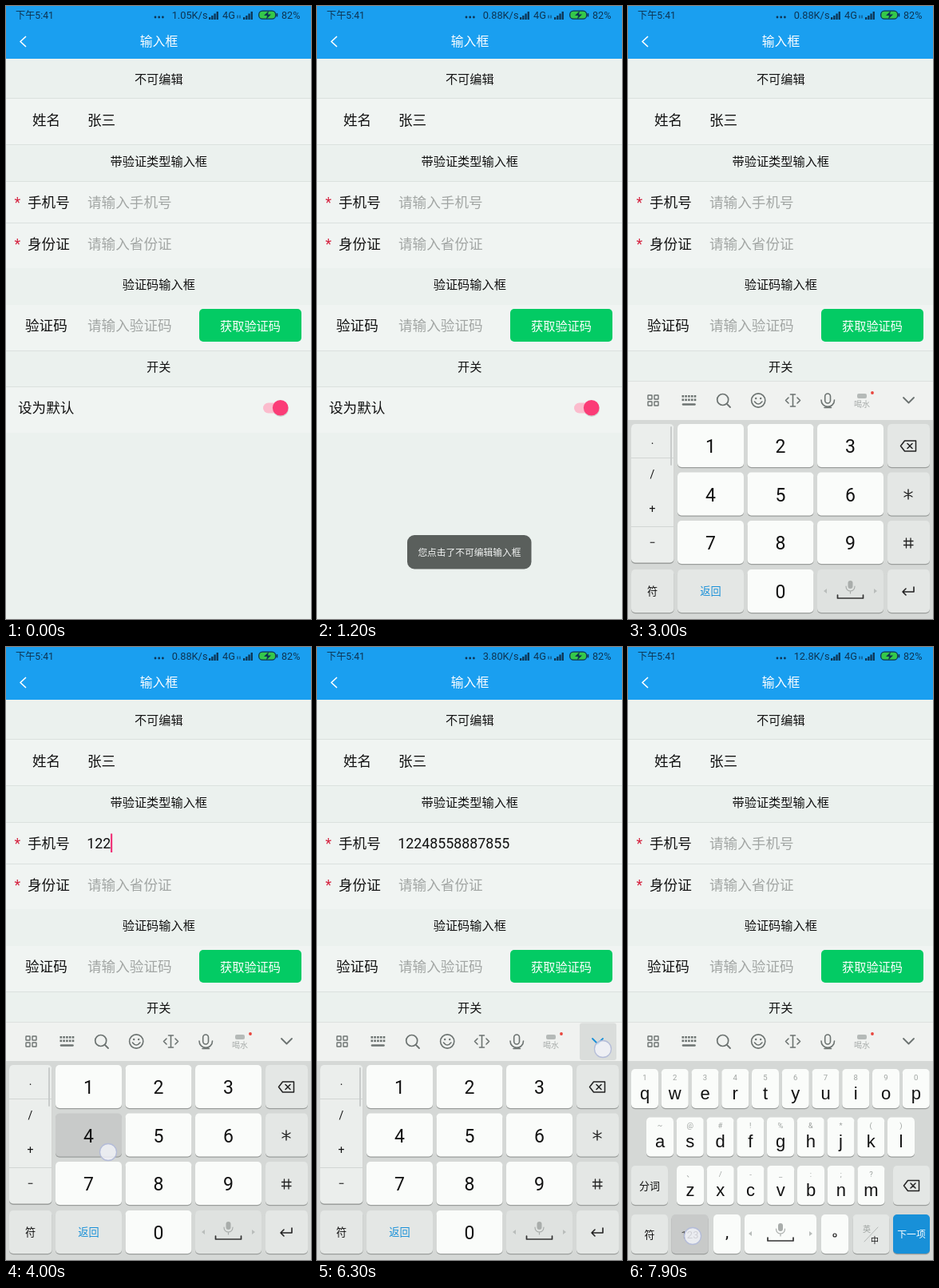
An HTML page that plays this animation: 382 px wide and 767 px high, repeating every 8 s.

```html
<!DOCTYPE html>
<html lang="zh-CN">
<head>
<meta charset="utf-8">
<title>输入框</title>
<style>
html, body { margin: 0; width: 100%; height: 100%; overflow: hidden; background: #ebf1ee; }
svg { display: block; width: 382px; height: 767px; }
text { font-family: Roboto, "Noto Sans CJK SC", "Noto Sans CJK", sans-serif; white-space: pre; }
.key { font-family: "Liberation Sans", Arial, sans-serif; }
.line { fill: none; stroke-linecap: round; stroke-linejoin: round; }
</style>
</head>
<body>
<svg id="stage" viewBox="0 0 382 767" xmlns="http://www.w3.org/2000/svg"></svg>
<script>
const LOOP = 8000, STEP = 100, KB_HEIGHT = 298;
const WHITE = '#fafcfa', GREY = '#e4e7e5', DOWN = '#c8cac9', BLUE = '#1890d8', ICON = '#6c7371';

// Markup helpers; text y is the visual middle of the line.
const text = (x, y, size, s, fill = '#111', more = '') =>
  `<text x="${x}" y="${y + size * 0.365}" font-size="${size}" fill="${fill}" ${more}>${s}</text>`;
const mid = (x, y, size, s, fill, more = '') =>
  text(x, y, size, s, fill, 'text-anchor="middle" ' + more);
const rect = (x, y, w, h, fill, r = 0, more = '') =>
  `<rect x="${x}" y="${y}" width="${w}" height="${h}" rx="${r}" fill="${fill}" ${more}/>`;
const circle = (x, y, r, fill, more = '') => `<circle cx="${x}" cy="${y}" r="${r}" fill="${fill}" ${more}/>`;
const line = (d, color = ICON, w = 1.6) =>
  `<path class="line" d="${d}" stroke="${color}" stroke-width="${w}"/>`;
const key = (name, x, y, w, h, fill = WHITE) =>
  rect(x, y + 1.2, w, h, '#9b9e9c', 5) + rect(x, y, w, h, fill, 5, `id="k-${name}"`);

function statusBar() {
  const ink = '#0d3453';
  const bars = x => [3, 5, 7.5, 10].map((h, i) => rect(x + i * 3.2, 17 - h, 2.3, h, ink)).join('');
  return rect(0, 0, 382, 66, '#1a9ff0') +
    text(12, 11.5, 12.2, '下午5:41', ink) +
    [187, 191.7, 196.4].map(x => circle(x, 14, 1.4, ink)).join('') +
    text(252.5, 11.5, 12.8, '', ink, 'id="speed" text-anchor="end"') +
    bars(254) + text(271, 11.5, 12.8, '4G', ink) + line('M290 12v3M293 12v3', ink, 1) + bars(297) +
    rect(316.7, 6.2, 21, 10, '#35c84a', 4.5, `stroke="${ink}" stroke-width="1.3"`) +
    rect(338.5, 9, 1.8, 4.5, ink, 0.8) +
    `<path d="M329 6l-6 6h4l-1 4.500 6-6h-4z" fill="${ink}"/>` +
    text(345, 11.5, 12.6, '82%', ink) +
    line('M24.500 38.500L18 44.500l6.500 6', '#fff', 1.7) +
    mid(191.5, 44.5, 15.8, '输入框', '#fff', 'font-weight="500"');
}

function form() {
  const rows = [[116, 57], [220, 51], [272, 56], [374, 57], [477, 57]];
  const heads = [[91, '不可编辑'], [194, '带验证类型输入框'], [348, '验证码输入框'], [451, '开关']];
  const labels = [[33, 143, '姓名'], [27, 246, '手机号'], [27, 297.5, '身份证'],
    [24, 400, '验证码'], [15, 503, '设为默认'], [102, 143, '张三']];
  const hint = '#a2a6a4';
  return rect(0, 66, 382, 701, '#ebf1ee') +
    rows.map(([y, h]) => rect(0, y, 382, h, '#f0f4f2')).join('') +
    [115, 173, 219, 271, 431, 476].map(y => rect(0, y, 382, 1, '#dbe1de')).join('') +
    heads.map(([y, s]) => mid(191.3, y, 15.2, s)).join('') +
    labels.map(([x, y, s]) => text(x, y, 17.6, s)).join('') +
    [246, 297.5].map(y => text(10.5, y, 17.6, '*', '#d52440')).join('') +
    text(102, 246, 17.6, '请输入手机号', hint, 'id="hint"') +
    text(102, 297.5, 17.6, '请输入省份证', hint) +
    text(102, 400, 17.6, '请输入验证码', hint) +
    text(101.3, 246, 17.8, '', '#111', 'id="phone"') +
    rect(101, 233.5, 2.2, 23.5, '#f0367a', 0, 'id="caret"') +
    rect(242, 379, 128, 41, '#03cb64', 5) + mid(306, 400, 15.2, '获取验证码', '#fff') +
    rect(322, 496.5, 28, 13, '#fbbccd', 6.5) +
    circle(344, 504, 10, '#cfd3d1') + circle(343.7, 502.8, 9.8, '#fb3c77');
}

function toolbar() {
  const dots = [0, 1, 2, 3, 4].map(i =>
    rect(67.5 + i * 3.8, 487, 2.6, 2.6, ICON) + rect(67.5 + i * 3.8, 491.5, 2.6, 2.6, ICON)).join('');
  const tiles = [[25, 487], [33, 487], [25, 495], [33, 495]].map(([x, y]) =>
    rect(x, y, 5, 5, 'none', 0.6, `stroke="${ICON}" stroke-width="1.4"`)).join('');
  return rect(0, 469, 382, 49, '#f0f2f0') + rect(0, 469, 382, 1, '#dde1df') +
    rect(329, 470.5, 46, 46.5, '#dadddb', 3, 'id="foldbg"') + tiles + dots +
    line('M69 498.500h14.500', ICON, 2.6) +
    circle(118.7, 492.5, 7, 'none', `stroke="${ICON}" stroke-width="1.7"`) + line('M124 498l4 4', ICON, 1.8) +
    circle(163.2, 493.5, 8.6, 'none', `stroke="${ICON}" stroke-width="1.6"`) +
    circle(160.2, 491, 1.2, ICON) + circle(166.2, 491, 1.2, ICON) + line('M158.500 495q4.700 6 9.400 0') +
    line('M206.500 486v15M203.500 486h6M203.500 501h6M201 490l-3.500 3.500 3.500 3.500M212 490l3.500 3.500-3.500 3.500') +
    rect(246.7, 485, 6.8, 12, 'none', 3.4, `stroke="${ICON}" stroke-width="1.6"`) +
    line('M242 493c0 11 16.500 11 16.500 0M246 502.500h8.500') +
    rect(287, 485, 12, 6, '#b5bab8', 2) + mid(293, 498, 10, '喝水', '#a8adab') +
    circle(306, 484, 1.9, '#e8453c') +
    `<path id="fold" class="line" d="M345 490l6.500 6.500 6.500-6.500" stroke-width="1.800"/>`;
}

const space = (x, y) => rect(x - 3, y - 14, 6, 10, '#a9adab', 3) +
  line(`M${x - 5.5} ${y - 7}c0 8 11 8 11 0M${x} ${y - 1}v3`, '#a9adab', 1.2) +
  line(`M${x - 16} ${y + 4}v4h32v-4`, '#333', 1.7);
const arrows = (a, b, y) => `<path d="M${a} ${y}l4-3v6zM${b} ${y}l-4-3v6z" fill="#b9bdbb"/>`;
const erase = (x, y) =>
  line(`M${x - 9.5} ${y}l5-6.500h14v13h-14zM${x - 1} ${y - 3}l6 6M${x + 5} ${y - 3}l-6 6`, '#222', 1.5);

const COLS = [62, 149.5, 237], ROWS = [523, 583.5, 644, 705];

function numberPad() {
  let s = rect(4, 524, 53.5, 174, '#9b9e9c', 5) + rect(4, 523, 53.5, 173.5, '#ebeeec', 5) +
    [565, 651].map(y => rect(4, y, 53.5, 1, '#d2d6d4')).join('') + rect(53, 526, 2, 49, '#c9cccb', 1) +
    ['·', '/', '+', '−'].map((c, i) => mid(30.5, [548, 586, 628.5, 671][i], 14, c)).join('');
  for (let n = 1; n <= 9; n++) {
    const x = COLS[(n - 1) % 3], y = ROWS[Math.floor((n - 1) / 3)];
    s += key(n, x, y, 83, 54) + mid(x + 41.5, y + 28, 23, n);
  }
  ROWS.forEach((y, i) => s += key('side' + i, 325, y, 53, 54, GREY));
  return s + erase(351, 550.5) +
    line('M351 605v12M346 608l10 6M356 608l-10 6', '#222', 1.4) +
    line('M348.500 666v12M354 666v12M345.500 669.500h11.500M345.500 674.500h11.500', '#222', 1.3) +
    line('M358 727v6h-14M348 729l-4 4 4 4', '#222', 1.6) +
    key('sym', 4, 705, 53.5, 54, GREY) + mid(30.7, 732.5, 13.2, '符') +
    key('back', 62, 705, 83, 54, GREY) + mid(103.5, 732.5, 13.2, '返回', BLUE) +
    key('zero', 149.5, 705, 83, 54) + mid(191, 733, 23, 0) +
    key('talk', 237, 705, 83, 54, '#dfe2e0') + space(278.5, 733) + arrows(245, 312, 732);
}

function letterPad() {
  const row = (letters, hints, x, y) => [...letters].map((c, i) => {
    const left = x + i * 37.75;
    return key(c, left, y, 34, 49) + mid(left + 17, y + 10.5, 9.5, hints[i], '#9ea3a0') +
      mid(left + 17, y + 29.5, 22, c, '#111', 'class="key"');
  }).join('');
  return row('qwertyuiop', '1234567890', 4, 528) +
    row('asdfghjkl', '~@#!%&*()', 23, 588.5) + row('zxcvbnm', '、/-_:;?', 61, 649) +
    key('split', 4, 649, 46, 49, GREY) + mid(27, 674, 13, '分词') +
    key('erase', 332, 649, 46, 49, GREY) + erase(355, 674) +
    key('sym2', 4, 710, 46, 49, GREY) + mid(27, 735, 13, '符') +
    key('123', 54.5, 710, 46, 49, GREY) + mid(77.5, 735, 13, '123', '#444') +
    key('comma', 107, 710, 34, 49) + mid(124, 731, 21, ',') +
    key('space', 146, 710, 90, 49) + space(191, 735) + arrows(151, 231, 734) +
    key('stop', 242, 710, 34, 49) + circle(259, 736, 2, 'none', 'stroke="#222" stroke-width="1.2"') +
    key('lang', 281.5, 710, 46, 49, GREY) + mid(299, 728, 10, '英', '#9ea3a0') +
    line('M296 744l17-18', '#b4b8b6', 1) + mid(309, 742, 10, '中') +
    key('next', 332, 710, 46, 49, BLUE) + mid(355, 735, 11.8, '下一项', '#fff');
}

const stage = document.getElementById('stage');
stage.innerHTML = form() + statusBar() +
  `<g id="kb">${rect(0, 518, 382, 249, '#d5d8d6')}${toolbar()}` +
  `<g id="num">${numberPad()}</g><g id="abc">${letterPad()}</g></g>` +
  `<g id="toast">${rect(113, 662, 155.5, 42.5, '#5a5f5c', 9)}${mid(191, 683.5, 11.75, '您点击了不可编辑输入框', '#f2f4f3')}</g>` +
  circle(0, 0, 10.5, 'rgba(242,244,250,.8)', 'id="touch" stroke="#b4bcd8" stroke-width="1.3"');
const el = id => document.getElementById(id);
const show = (id, on) => el(id).style.display = on ? '' : 'none';

// Typed digits, the time each key goes down, and where the finger lands.
const NUMBER = '12248558887855';
const PRESSES = [3400, 3600, 3800, 4000, 4300, 4400, 4600, 4700, 4800, 5000, 5100, 5300, 5500, 5700];
const SPOTS = { 1: [118, 560], 2: [205, 562], 4: [128, 632], 5: [199, 597], 7: [127, 645], 8: [205, 662] };
const COMMITS = PRESSES.map(t => t + 100);

// Touches: start, end, x, y, key.
const TOUCHES = [
  [500, 700, 212, 147], [2000, 2200, 226, 248], [2600, 2800, 72, 745, '123'],
  ...PRESSES.map((t, i) => [t, t + 100, ...SPOTS[NUMBER[i]], NUMBER[i]]),
  [6100, 6400, 358, 503, 'fold'], [7000, 7200, 237, 256], [7800, 8000, 81, 737, '123']
];
const SPEEDS = [[0, '1.05K/s'], [500, '0.88K/s'], [4200, '3.80K/s'], [7800, '12.8K/s']];
const BLINKS = [2100, ...COMMITS, 7100];

const ramp = (t, a, b) => Math.min(1, Math.max(0, (t - a) / (b - a)));
const easeOut = p => 1 - (1 - p) ** 2;
let pressed = null;

function press(name) {
  if (pressed) pressed.style.fill = '';
  pressed = name ? el('k-' + name) : null;
  if (pressed) pressed.style.fill = DOWN;
}

function draw(t) {
  el('speed').textContent = SPEEDS.filter(s => s[0] <= t).pop()[1];

  const typed = t < 6400 ? COMMITS.filter(c => c <= t).length : 0;
  el('phone').textContent = NUMBER.slice(0, typed);
  show('hint', !typed);
  const focused = (t >= 2100 && t < 6400) || t >= 7100;
  const since = t - (BLINKS.filter(b => b <= t).pop() || 0);
  show('caret', focused && since % 1000 < 500);
  el('caret').setAttribute('x', 101 + typed * 10);

  const up = t < 6300 ? easeOut(ramp(t, 2100, 2400))
    : t < 7000 ? 1 - ramp(t, 6300, 6500) : easeOut(ramp(t, 7100, 7400));
  show('kb', up > 0);
  el('kb').setAttribute('transform', `translate(0 ${KB_HEIGHT * (1 - up)})`);
  const digits = t >= 2800 && t < 7000;
  show('num', digits);
  show('abc', !digits);

  const toast = ramp(t, 600, 1100) * (1 - ramp(t, 1900, 2300));
  el('toast').setAttribute('opacity', toast);

  const touch = TOUCHES.find(([a, b]) => t >= a && t < b);
  show('touch', touch);
  if (touch) {
    el('touch').setAttribute('cx', touch[2]);
    el('touch').setAttribute('cy', touch[3]);
  }
  const name = touch && touch[4], folding = name === 'fold';
  press(folding ? null : name);
  show('foldbg', folding);
  el('fold').setAttribute('stroke', folding ? BLUE : ICON);
}

const start = performance.now();
let last = -1;
function tick() {
  const t = Math.floor((performance.now() - start) % LOOP / STEP) * STEP;
  if (t !== last) draw(last = t);
  requestAnimationFrame(tick);
}
tick();
</script>
</body>
</html>
```
